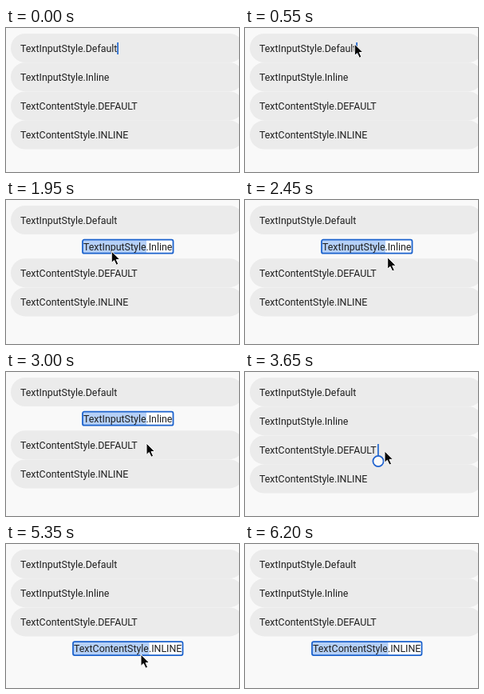
An HTML page that plays this animation: 292x180 px, repeating every 6.4 s.

```html
<!DOCTYPE html>
<html lang="en">
<head>
<meta charset="utf-8">
<title>Text input styles</title>
<style>
  html, body { margin: 0; width: 100%; height: 100%; overflow: hidden; background: #f9f9f9; }
  svg { display: block; width: 292px; height: 180px; }
  text { font: 12.4px Roboto, "Noto Sans", sans-serif; fill: #202020; }
  .pill { fill: #ebebeb; }
  .mark { fill: #b5d0f7; }
  .frame { fill: none; stroke: #1b62cd; stroke-width: 1.8; }
  .caret { fill: #2d6fd2; }
  .handle { fill: #fafafa; stroke: #1f62cf; stroke-width: 1.8; }
</style>
</head>
<body>
<svg id="stage" viewBox="0 0 292 180"></svg>
<script>
const LOOP = 6400;
const ROW = 36.2, INLINE_ROW = 30;
const stage = document.getElementById('stage');

// Optional inline editor: box left, box width, selection end, visible period
const rows = [
  { label: 'TextInputStyle.Default' },
  { label: 'TextInputStyle.Inline', box: [96, 113.5, 176], on: [1600, 3600] },
  { label: 'TextContentStyle.DEFAULT' },
  { label: 'TextContentStyle.INLINE', box: [84, 137.5, 179.5], on: [4500, LOOP] }
];

const carets = [
  { x: 139.2, y: 18, on: [0, 1600] },
  { x: 166, y: 90, on: [3600, 4150] }
];
const handles = [
  { x: 140, y: 39.8, on: [700, 1600] },
  { x: 167, y: 111.5, on: [3600, 4500] }
];

// Pointer tip: time, x, y
const path = [
  [0, 150, 182], [50, 150, 182], [500, 138, 18], [650, 136, 24], [750, 136, 27],
  [900, 136, 27], [1200, 136, 56], [1500, 133, 62], [1950, 132, 64], [2150, 181, 62],
  [2800, 176, 83], [3000, 176, 89], [3500, 176, 89], [4100, 172, 128], [4350, 170, 134],
  [4750, 169, 138], [5550, 169, 138], [5750, 167, 182], [LOOP, 167, 182]
];

function add(parent, tag, attrs, content) {
  const el = document.createElementNS('http://www.w3.org/2000/svg', tag);
  for (const key in attrs) el.setAttribute(key, attrs[key]);
  if (content) el.textContent = content;
  return parent.appendChild(el);
}

const rect = (parent, cls, x, y, width, height, rx = 0) =>
  add(parent, 'rect', { class: cls, x, y, width, height, rx });
const active = (span, t) => t >= span[0] && t < span[1];
const show = (el, on) => el.setAttribute('visibility', on ? 'visible' : 'hidden');
const move = (el, x, y) => el.setAttribute('transform', `translate(${x} ${y})`);

for (const row of rows) {
  row.group = add(stage, 'g', {});
  row.plain = add(row.group, 'g', {});
  rect(row.plain, 'pill', 6, 0, 292, 36, 18);
  add(row.plain, 'text', { x: 18, y: 22.8 }, row.label);
  if (row.box) {
    const [x, width, end] = row.box;
    row.inline = add(row.group, 'g', {});
    add(row.inline, 'rect', { x, y: 6.5, width, height: 17, rx: 2, fill: '#fff' });
    rect(row.inline, 'mark', x + 1, 7, end - x - 1, 16);
    rect(row.inline, 'frame', x, 6.5, width, 17, 2);
    add(row.inline, 'text', { x: x + 1, y: 19.5 }, row.label);
  }
}
for (const c of carets) c.el = rect(stage, 'caret', c.x, c.y, 1.8, 15);
for (const h of handles) {
  h.el = add(stage, 'circle', { class: 'handle', cx: h.x, cy: h.y, r: 6.6 });
}
const pointer = add(stage, 'path', {
  d: 'M0 0V14.5L3.3 11.5L6 17.3L8.6 16.1L6 10.5H10.6Z',
  fill: '#080808', stroke: '#fff', 'stroke-width': 1, 'stroke-linejoin': 'round'
});

function pointerAt(t) {
  const i = path.findIndex(p => p[0] > t);
  const [t0, x0, y0] = path[i - 1], [t1, x1, y1] = path[i];
  const k = (t - t0) / (t1 - t0);
  return [x0 + (x1 - x0) * k, y0 + (y1 - y0) * k];
}

function draw(t) {
  let y = 7;
  for (const row of rows) {
    const inline = !!row.box && active(row.on, t);
    move(row.group, 0, y);
    show(row.plain, !inline);
    if (row.inline) show(row.inline, inline);
    y += inline ? INLINE_ROW : ROW;
  }
  for (const item of [...carets, ...handles]) show(item.el, active(item.on, t));
  move(pointer, ...pointerAt(t));
}

const start = performance.now();
function tick() {
  draw((performance.now() - start) % LOOP);
  requestAnimationFrame(tick);
}
draw(0);
requestAnimationFrame(tick);
</script>
</body>
</html>
```
